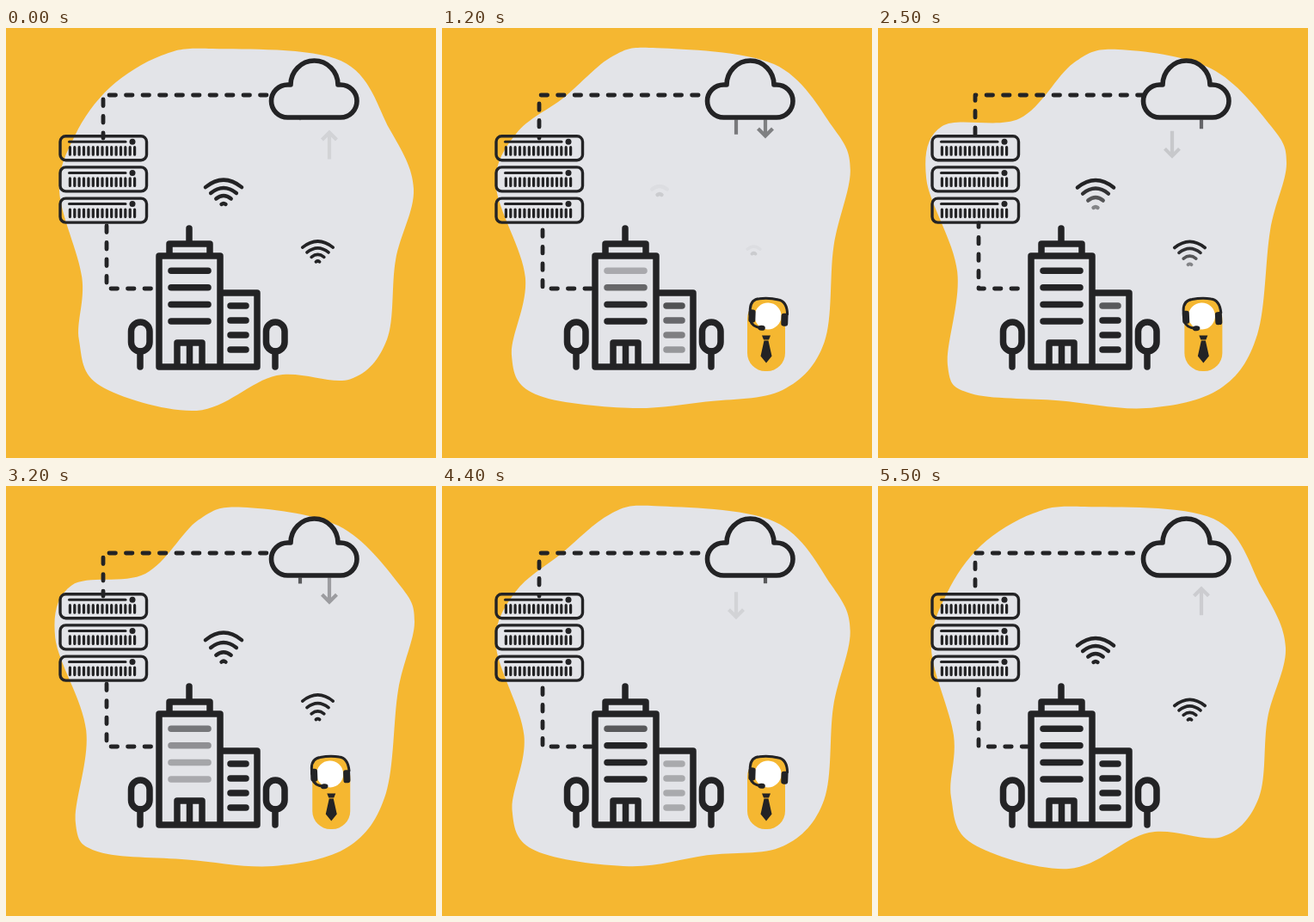
Animation of 500x500 px, one loop 5600 ms. Source, as an HTML page:

```html
<!DOCTYPE html>
<html lang="en">
<head>
<meta charset="utf-8">
<title>Cloud office</title>
<style>
  html, body { margin: 0; width: 100%; height: 100%; overflow: hidden; background: #f5b731; }
  svg { display: block; width: 100vw; height: 100vh; }
  .line { fill: none; stroke: #232325; stroke-linecap: round; stroke-linejoin: round; }
  .sharp { stroke-linecap: butt; stroke-linejoin: miter; }
  .ink { fill: #232325; }
</style>
</head>
<body>
<svg id="stage" viewBox="0 0 500 500">
  <defs>
    <clipPath id="inBlob"><path id="blobClip"/></clipPath>
    <clipPath id="underCloud"><rect x="300" y="106.5" width="120" height="70"/></clipPath>
  </defs>
  <path id="blob" fill="#e3e4e8"/>

  <g clip-path="url(#inBlob)">
    <g id="person">
      <rect x="355" y="317" width="44" height="82" rx="21" fill="#f5b731"/>
      <path class="ink" d="M372 357.500h10l-2 5h-6zM374.500 363.500h5l4 18-6.500 8-6.500-8z"/>
      <g id="head">
        <path d="M357.500 340V326Q357.500 315 369 315H389Q401 316 401 328V340Q400 350 389 350H368Q358 349 357.500 340Z" fill="#f5b731"/>
        <circle cx="378.500" cy="335" r="15.500" fill="#fff"/>
        <path class="line" stroke-width="3" d="M357.500 334V327Q358 316 368 315Q380 313.500 390 315.500Q400 317 401 332M358 340Q360 348 371 349"/>
        <rect class="ink" x="356" y="328" width="8" height="15" rx="3"/>
        <rect class="ink" x="394" y="331" width="8" height="15" rx="3"/>
        <ellipse class="ink" cx="371.500" cy="349" rx="4.300" ry="3"/>
      </g>
    </g>
  </g>

  <g id="arrows" class="line sharp" stroke-width="4.200" clip-path="url(#underCloud)"></g>
  <path class="line" stroke-width="5.600" d="M327.500 104A19 19 0 0 1 327.500 66H331A27.500 28 0 0 1 386 66H389A19 19 0 0 1 389 104Z"/>

  <g class="line" stroke-width="4.800" stroke-dasharray="7.500 12">
    <path id="upperLink" d="M308 78H113V128"/>
    <path id="lowerLink" d="M117 227V303H174"/>
  </g>

  <g id="servers"></g>

  <g class="line" stroke-width="7.500">
    <path d="M178 265H249V394H178ZM190 265V251H237V265M213 249V233M249 308H292V394H249"/>
    <path d="M199 392V366H228V392M213.500 366V392"/>
    <path d="M156 376V394M313 376V394"/>
    <rect x="145.500" y="342" width="21.500" height="34" rx="10.750"/>
    <rect x="302.500" y="342" width="21.500" height="34" rx="10.750"/>
  </g>
  <g id="windows" class="line" stroke-width="7.500"></g>
  <g id="signals" class="line" stroke-width="4.400"></g>
</svg>

<script>
const LOOP = 5600, HALF = LOOP / 2, STEP = 100;
const $ = id => document.getElementById(id);
const clamp = x => Math.min(1, Math.max(0, x));
const ramp = (t, from, length) => clamp((t - from) / length);
const smooth = x => x * x * (3 - 2 * x);
const mix = (a, b, u) => a + (b - a) * u;

function add(parent, tag, attrs) {
  const node = document.createElementNS('http://www.w3.org/2000/svg', tag);
  for (const key in attrs) node.setAttribute(key, attrs[key]);
  parent.appendChild(node);
  return node;
}

// Three poses of the blob, clockwise from the top; each point follows one feature.
const wavy = [240,24, 390,38, 446,118, 474,188, 453,270, 443,362, 400,408, 315,403,
  222,445, 110,416, 85,362, 88,290, 62,190, 80,125, 120,69, 180,32];
const round = [252,23, 385,43, 456,114, 475,160, 456,250, 445,366, 395,424, 305,442,
  215,441, 108,428, 80,385, 99,290, 63,182, 88,122, 148,83, 203,33];
const notched = [280,25, 387,47, 457,114, 475,158, 456,235, 441,356, 398,419, 312,442,
  210,433, 108,425, 81,392, 92,283, 56,175, 74,114, 165,106, 228,41];

function closedCurve(p) {
  const n = p.length / 2;
  const at = (i, axis) => p[((i + n) % n) * 2 + axis];
  const handle = (i, dir) => [0, 1].map(a =>
    (at(i, a) + dir * (at(i + 1, a) - at(i - 1, a)) / 6).toFixed(1));
  let d = `M${at(0, 0)} ${at(0, 1)}`;
  for (let i = 0; i < n; i++)
    d += `C${handle(i, 1)} ${handle(i + 1, -1)} ${at(i + 1, 0)} ${at(i + 1, 1)}`;
  return d + 'Z';
}

// The blob is most notched mid-loop and returns the way it came.
function drawBlob(t) {
  const gap = Math.abs(t - 2700), turn = 1200;
  const [from, to, u] = gap < turn
    ? [notched, round, (gap / turn) ** 2]
    : [round, wavy, ramp(gap, turn, 1540)];
  const d = closedCurve(from.map((v, i) => mix(v, to[i], u)));
  $('blob').setAttribute('d', d);
  $('blobClip').setAttribute('d', d);
}

for (let i = 0; i < 3; i++) {
  const g = add($('servers'), 'g', { transform: `translate(63 ${125.7 + 36.2 * i})`, class: 'line' });
  add(g, 'rect', { width: 100.5, height: 28, rx: 6.5, 'stroke-width': 3.4 });
  add(g, 'path', { d: 'M10.500 6.500H76', 'stroke-width': 3 });
  add(g, 'circle', { cx: 84, cy: 6.5, r: 3.5, class: 'ink', stroke: 'none' });
  let bars = '';
  for (let b = 0; b < 15; b++) bars += `M${(11.4 + b * 5.37).toFixed(1)} 13V21.500`;
  add(g, 'path', { d: bars, 'stroke-width': 3.2 });
}

// Window rows fade from the bottom row upwards; the right house follows the left.
const rows = [];
for (let k = 0; k < 4; k++) {
  rows.push({ k, delay: 0, node: add($('windows'), 'path', { d: `M192 ${341 - k * 19.6}H235` }) });
  rows.push({ k, delay: 900, node: add($('windows'), 'path', { d: `M261 ${374 - k * 17}H279` }) });
}
function drawWindows(t) {
  for (const { k, delay, node } of rows) {
    const s = t % HALF - delay;
    const dim = ramp(s, 60 * k, 350) - ramp(s, 700 + 70 * k * k, 450);
    node.setAttribute('opacity', 1 - 0.7 * dim);
  }
}

const arcs = [];
for (const place of ['translate(253 204)', 'translate(362.500 271) scale(.84)']) {
  const g = add($('signals'), 'g', { transform: place });
  for (let k = 0; k < 4; k++) {
    const w = 2.5 + 6.2 * k, s = 1 + 2.5 * k;
    arcs.push({ k, node: add(g, 'path', { d: `M${-w} ${s}Q0 ${-s} ${w} ${s}` }) });
  }
}
function drawSignals(t) {
  const s = t % HALF;
  for (const { k, node } of arcs) {
    const enter = smooth(ramp(s, 2320 - 60 * k, 360));
    const returning = s > 1900;
    const lift = returning ? 8 * (1 - enter) : -11 * smooth(ramp(s, 300 - 133 * k, 900));
    node.setAttribute('transform', `translate(0 ${lift - 9 * k})`);
    node.setAttribute('opacity', returning ? enter : 1 - ramp(s, 630 - 60 * k, 650));
  }
}

// Each arrow sinks out of the cloud pointing down and climbs back pointing up.
const arrows = [
  { x: 376, lowAt: -50, period: 1820, range: 47 },
  { x: 342, lowAt: 740, period: 1850, range: 63 }
].map(a => ({ ...a, node: add($('arrows'), 'path', {}) }));
function drawArrows(t) {
  for (const { x, lowAt, period, range, node } of arrows) {
    const phase = ((t - lowAt) / period + 1) % 1;
    const up = phase < 0.5;
    const low = 156 - range * (1 - Math.abs(1 - 2 * phase));
    const tip = up ? low - 32 : low - 1;
    const wing = tip + (up ? 8.5 : -8.5);
    node.setAttribute('d', `M${x} ${low - 30}V${low - 1}M${x - 8.5} ${wing}L${x} ${tip}L${x + 8.5} ${wing}`);
    node.setAttribute('opacity', 0.8 * clamp((159 - low) / 50));
  }
}

function drawPerson(t) {
  const away = 1 - smooth(ramp(t, 400, 700)) + smooth(ramp(t, 4550, 700));
  const sway = Math.sin(Math.PI * ramp(t, 1700, 2200));
  $('person').setAttribute('transform', `translate(${110 * away + 1.5 * sway} ${-24 * away})`);
  $('head').setAttribute('transform', `translate(${-3 * sway} 0) rotate(${2 * (1 - away) - 5 * sway} 378 350)`);
}

function drawLinks(t) {
  const flow = 19.5 * t / 533;
  $('upperLink').setAttribute('stroke-dashoffset', -(5 + flow));
  $('lowerLink').setAttribute('stroke-dashoffset', -(3 + flow));
}

const start = performance.now();
function frame() {
  const elapsed = (performance.now() - start) % LOOP;
  const t = Math.floor(elapsed / STEP) * STEP;
  for (const draw of [drawBlob, drawWindows, drawSignals, drawArrows, drawPerson, drawLinks]) draw(t);
  requestAnimationFrame(frame);
}
frame();
</script>
</body>
</html>
```
